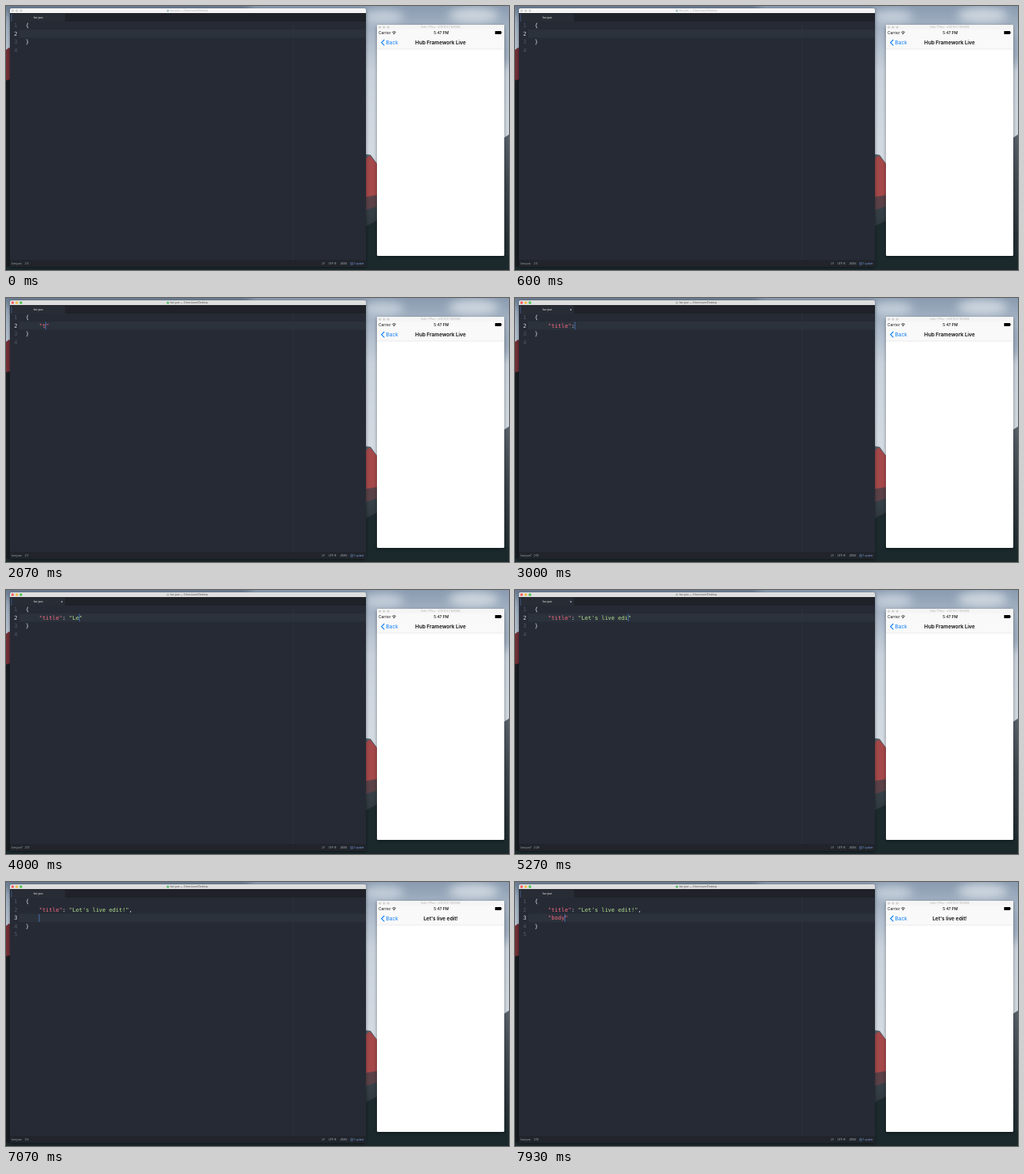
An HTML page that plays this animation: 640x337 px, repeating every 8000 ms.

```html
<!DOCTYPE html>
<html lang="en">
<head>
<meta charset="utf-8">
<title>Live JSON editing</title>
<style>
  html, body { margin: 0; width: 100%; height: 100%; overflow: hidden; background: #1a2629; }
  svg { position: absolute; inset: 0; width: 100%; height: 100%; }
  text { white-space: pre; font-family: Inter, sans-serif; }
  .code text { font: 7.06px "DejaVu Sans Mono", monospace; }
  .small { font-size: 3.15px; }
  .status { fill: #b4bbc8; }
</style>
</head>
<body>
<svg viewBox="0 0 640 337" preserveAspectRatio="none">
  <defs>
    <linearGradient id="sky" x2="0" y2="1">
      <stop offset="0" stop-color="#8a9bb0"/><stop offset=".1" stop-color="#a9b7c7"/>
      <stop offset=".25" stop-color="#c9d2dc"/><stop offset=".55" stop-color="#d3dae2"/>
    </linearGradient>
    <linearGradient id="rock" x2="0" y2="1">
      <stop offset="0" stop-color="#57616b"/><stop offset=".4" stop-color="#3b444b"/>
      <stop offset=".75" stop-color="#263136"/><stop offset="1" stop-color="#18272a"/>
    </linearGradient>
    <filter id="soft" x="-30%" y="-30%" width="160%" height="160%"><feGaussianBlur stdDeviation="6"/></filter>
    <filter id="shadow" x="-10%" y="-10%" width="120%" height="120%">
      <feDropShadow dx="0" dy="1.5" stdDeviation="2" flood-opacity=".4"/>
    </filter>
    <clipPath id="editorClip"><rect x="5" y="3" width="453" height="330" rx="1.5"/></clipPath>
    <clipPath id="phoneClip"><rect x="472" y="24" width="162" height="295" rx="1.5"/></clipPath>
  </defs>

  <g id="wallpaper">
    <rect width="640" height="337" fill="url(#sky)"/>
    <g filter="url(#soft)">
      <ellipse cx="480" cy="14" rx="26" ry="9" fill="#c3ced9"/>
      <ellipse cx="595" cy="12" rx="32" ry="10" fill="#ccd5de"/>
      <ellipse cx="634" cy="55" rx="12" ry="22" fill="#9cacbd"/>
      <rect x="-10" y="-10" width="320" height="18" fill="#66778d"/>
    </g>
    <path d="M0 88L8 92V337H0z" fill="#171d22"/>
    <path d="M0 56l4-3 4 4v36l-8 2z" fill="#712f36"/>
    <path d="M620 176l14-8 6-4v173H620z" fill="url(#rock)"/>
    <path d="M450 188l14 2 10 14v133H450z" fill="url(#rock)"/>
    <path d="M450 200l13-9 11 13v38l-24 3z" fill="#a5484a"/>
    <path d="M450 245l24-4v14l-24 8z" fill="#5a4147"/>
    <path d="M450 285l24-12v64H450z" fill="#1c2a2e"/>
    <path d="M0 333H450V318H640v19H0z" fill="#1b292d"/>
  </g>

  <rect x="5" y="3" width="453" height="330" rx="1.5" fill="#282c34" filter="url(#shadow)"/>
  <g clip-path="url(#editorClip)">
    <rect id="titleBar" x="5" y="3" width="453" height="6"/>
    <g id="editorLights"></g>
    <circle id="docIcon" cx="206" cy="6" r="1.6"/>
    <text id="path" class="small" x="209" y="7.2">live.json — /Users/user/Desktop</text>

    <rect x="5" y="9" width="453" height="11" fill="#1f2228"/>
    <rect x="6.5" y="9.6" width="68.5" height="10.4" fill="#282c34"/>
    <rect x="6.5" y="10.3" width=".8" height="9.5" fill="#456699"/>
    <text class="small" x="41" y="16.2" text-anchor="middle" fill="#fff">live.json</text>
    <circle id="tabDot" cx="71" cy="15" r=".9" fill="#a5b4d4"/>

    <rect id="activeLine" x="17" width="441" height="10.55" fill="#2c323c"/>
    <rect x="365" y="20" width=".8" height="304" fill="#2f343d"/>
    <g id="code" class="code"></g>
    <rect id="cursor" width=".7" height="10" fill="#5080d8"/>

    <rect x="5" y="324" width="453" height="9" fill="#21252b"/>
    <g class="small status">
      <text id="fileName" x="7.5" y="330.2"></text>
      <text id="position" x="24" y="330.2"></text>
      <text x="402" y="330.2">LF</text>
      <text x="410.5" y="330.2">UTF-8</text>
      <text x="425" y="330.2">JSON</text>
      <path d="M438.4 327.8l1.6-.7 1.6.7v2.3l-1.6.7-1.6-.7zl1.6.7 1.6-.7M440 328.5v2.3" fill="none" stroke="#6c8fd0" stroke-width=".4"/>
      <text x="443" y="330.2" fill="#7f9fe0">1 update</text>
    </g>
  </g>

  <rect x="472" y="24" width="162" height="295" rx="1.5" fill="#fff" filter="url(#shadow)"/>
  <g clip-path="url(#phoneClip)">
    <rect x="472" y="24" width="162" height="31" fill="#f9f9f9"/>
    <rect x="472" y="24" width="162" height="6" fill="#f5f5f5"/>
    <g id="phoneLights"></g>
    <text x="553" y="28.3" font-size="3.3" text-anchor="middle" fill="#adadad">Velto 7 Plus – vOS 10.0 (14A345)</text>
    <text x="474" y="35.9" font-size="4.8" fill="#111">Carrier</text>
    <g fill="none" stroke="#111" stroke-width=".75">
      <path d="M491.4 33.6a3.5 3.5 0 0 1 4.8 0M492.4 34.8a2.1 2.1 0 0 1 2.8 0"/>
      <circle cx="493.8" cy="35.8" r=".3"/>
    </g>
    <text x="553.8" y="35.9" font-size="4.8" font-weight="500" text-anchor="middle" fill="#111">5:47 PM</text>
    <rect x="622.3" y="32.1" width="7.8" height="3.8" rx=".5" fill="#000"/>
    <rect x="630.4" y="33.3" width=".7" height="1.4" fill="#000"/>
    <path d="M481.4 43l-3.6 3.7 3.6 3.7" fill="none" stroke="#087cf9" stroke-width="1.1"/>
    <text x="483.6" y="49" font-size="6.5" fill="#087cf9">Back</text>
    <text id="phoneTitle" x="553" y="49" font-size="6.5" font-weight="600" text-anchor="middle" fill="#0a0a0a"></text>
    <rect x="472" y="54.8" width="162" height=".4" fill="#cfcfd1"/>
  </g>
</svg>

<script>
const LOOP = 8000, FOCUS = 900, DIRTY = 2935, SAVE = 6000, REFRESH = 6150;
const CHAR = 4.25, LINE = 10.55, LEFT = 25, TOP = 19.5;
const PLAIN = '#e3e6ec', KEY = '#f76c80', STRING = '#b3e38f';

// Bursts of typing: start time, delay per key, keys.
const bursts = [
  [1900, 105, '"title":'],
  [3350, 190, ' "Le'],
  [4060, 105, 't\'s live edit!"'],
  [6750, 180, ',\n'],
  [7400, 125, '"body'],
];
const keys = bursts.flatMap(([start, step, text]) =>
  [...text].map((char, i) => ({ time: start + i * step, char })));

const el = id => document.getElementById(id);
const set = (id, attrs) => {
  for (const name in attrs) el(id).setAttribute(name, attrs[name]);
};
const show = (id, visible) => set(id, { visibility: visible ? 'visible' : 'hidden' });

function lights(id, x, y, colors) {
  el(id).innerHTML = colors.map((color, i) =>
    `<circle cx="${x + i * 5.3}" cy="${y}" r="1.7" fill="${color}"/>`).join('');
}

function colorize(line) {
  let seenColon = false;
  return line.replace(/"[^"]*"|[^"]+/g, part => {
    const quoted = part[0] === '"';
    if (!quoted && part.includes(':')) seenColon = true;
    const color = !quoted ? PLAIN : seenColon ? STRING : KEY;
    return `<tspan fill="${color}">${part}</tspan>`;
  });
}

function drawCode(lines, active) {
  el('code').innerHTML = lines.map((line, i) => {
    const y = TOP + i * LINE + 7.7;
    const shade = i === active ? '#d5d9e1' : '#4f5665';
    return `<text x="14.5" y="${y}" text-anchor="end" fill="${shade}">${i + 1}</text>` +
      `<text x="${LEFT}" y="${y}">${colorize(line)}</text>`;
  }).join('');
}

let lastState = '';

function draw(t) {
  const pressed = keys.filter(key => key.time <= t);
  const body = pressed.map(key => key.char).join('').split('\n').map(s => '    ' + s);
  const active = body.length;
  const column = body[active - 1].length;
  const openQuote = body[active - 1].split('"').length % 2 === 0;
  if (openQuote) body[active - 1] += '"';

  const focused = t >= FOCUS;
  const dirty = t >= DIRTY && t < SAVE;
  const lastKey = pressed.length ? pressed[pressed.length - 1].time : FOCUS;
  show('cursor', focused && (t - lastKey) % 800 < 400);

  const state = [pressed.length, focused, dirty, t >= REFRESH].join();
  if (state === lastState) return;
  lastState = state;

  drawCode(['{', ...body, '}', ''], active);
  set('activeLine', { y: TOP + active * LINE });
  set('cursor', { x: LEFT + column * CHAR - .2, y: TOP + active * LINE + .3 });
  el('position').textContent = `${active + 1}:${column + 1}`;
  el('fileName').textContent = 'live.json' + (dirty ? '*' : '');
  el('phoneTitle').textContent = t >= REFRESH ? "Let's live edit!" : 'Hub Framework Live';
  show('tabDot', dirty);
  set('titleBar', { fill: focused ? '#dedede' : '#f4f4f4' });
  set('path', { fill: focused ? '#444' : '#aaa' });
  set('docIcon', { fill: !focused ? '#a9bfc0' : dirty ? '#aab8ae' : '#55b763' });
  lights('editorLights', 8.4, 6, focused ? ['#fc5b57', '#f5bd3f', '#43c64b'] : Array(3).fill('#d3d3d3'));
}

lights('phoneLights', 475.6, 27.1, Array(3).fill('#d3d3d3'));

function frame() {
  draw(performance.now() % LOOP);
  requestAnimationFrame(frame);
}
frame();
</script>
</body>
</html>
```
